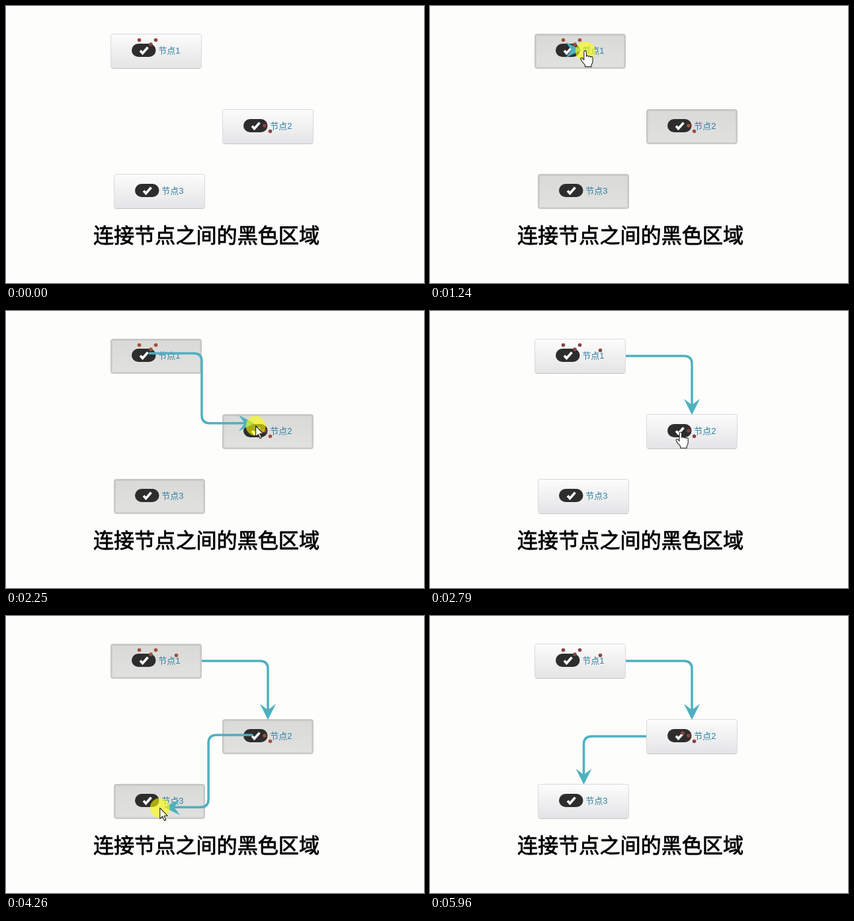
These frames come from a looping animation (632x419 px, 6040 ms). An HTML page:

```html
<!DOCTYPE html>
<html lang="zh-CN">
<head>
<meta charset="utf-8">
<title>连接节点</title>
<style>
  html, body { margin: 0; width: 100%; height: 100%; overflow: hidden; background: #fdfdfb; }
  svg { display: block; width: 632px; height: 419px; }
  .label { font: 13px "Liberation Sans", "Noto Sans CJK SC", "Noto Sans CJK", sans-serif; fill: #2f7f9e; }
  .caption { font: 31.1px "Noto Sans CJK SC", "Noto Sans CJK", sans-serif; fill: #000; stroke: #000; stroke-width: .8; }
  .box { fill: url(#light); stroke: #d9d9de; }
  .edge { fill: none; stroke: #c4c4c6; }
  .inset { fill: none; stroke: #777; stroke-opacity: .16; stroke-width: 2; visibility: hidden; }
  .drag .box { fill: url(#active); stroke: #c4c4c4; }
  .drag .inset { visibility: visible; }
  .drag .edge { visibility: hidden; }
  .pill { fill: #2d2d2d; }
  .check { fill: none; stroke: #fff; stroke-width: 3.6; }
  .dot { fill: #8a4444; }
  .drag .dot { fill: #a0523a; }
  .wire { fill: none; stroke: #4db1c0; stroke-width: 3.5; }
  .head { fill: #4db1c0; }
  .cursor path { stroke: #222; stroke-width: 1.1; stroke-linejoin: round; }
</style>
</head>
<body>
<svg id="stage" viewBox="0 0 632 419">
  <defs>
    <linearGradient id="light" x2="0" y2="1">
      <stop offset="0" stop-color="#fcfcfc"/>
      <stop offset="1" stop-color="#e4e4e6"/>
    </linearGradient>
    <linearGradient id="active" x2="0" y2="1">
      <stop offset="0" stop-color="#d9d9d8"/>
      <stop offset="1" stop-color="#e1e1e0"/>
    </linearGradient>
  </defs>
  <g id="nodes"></g>
  <text class="caption" x="132" y="357.6">连接节点之间的黑色区域</text>
  <g id="dots"></g>
  <g id="wires"></g>
  <circle id="glow" r="15" fill="#ff0" fill-opacity=".6"/>
  <g id="cursor" class="cursor">
    <path id="arrow" fill="#ffffe0" d="M0 0V16.2L3.8 12.8L6.6 19L9 18L6.3 11.8H11.4Z"/>
    <path id="hand" fill="#fff" d="M-2 1a1.8 1.8 0 0 1 3.6 0v6.5a1.8 1.8 0 0 1 3.4 .6a1.7 1.7 0 0 1 3.2 .9a1.6 1.6 0 0 1 3 1.2v5q0 3-2 5v3h-9.5v-2.5q-4-4-6.4-8.5q-.8-2 .8-2.4t3.9 3z"/>
  </g>
</svg>
<script>
const LOOP = 6040, STEPS = 78, STEP = LOOP / STEPS;
const $ = id => document.getElementById(id);

function add(parent, tag, attrs, text) {
  const el = document.createElementNS('http://www.w3.org/2000/svg', tag);
  for (const key in attrs) el.setAttribute(key, attrs[key]);
  if (text) el.textContent = text;
  return parent.appendChild(el);
}

function show(el, on) {
  el.style.display = on ? '' : 'none';
}

// Easings
const out = f => 1 - (1 - f) ** 2;
const into = f => f * f;
const soft = f => .3 * f + .7 * f * f * (3 - 2 * f);

// Where the pointer stops on its way
const outside = [478, 381], first = [216, 64], second = [379, 184], grip = [373, 180];
const turn = [206, 290], third = [214, 279], rest = [214, 285], exit = [535, 400];

// Each move runs between two steps; `via` bends the way
const moves = [
  { from: 3, to: 11, a: outside, b: first, ease: out },
  { from: 14, to: 31, a: first, b: second, via: [372, 100], ease: soft },
  { from: 36, to: 38, a: second, b: grip, ease: out },
  { from: 41, to: 57, a: grip, b: turn, via: [412, 297], ease: soft },
  { from: 57, to: 63, a: turn, b: third, ease: soft },
  { from: 65, to: 67, a: third, b: rest, ease: out },
  { from: 69, to: 76, a: rest, b: exit, ease: into }
];

function pointer(s) {
  const { from, to, a, b, via, ease } = moves.findLast(m => s >= m.from) || moves[0];
  const f = ease(Math.min(1, Math.max(0, (s - from) / (to - from))));
  return a.map((p, i) => {
    const c = via ? via[i] : (p + b[i]) / 2;
    return (1 - f) ** 2 * p + 2 * f * (1 - f) * c + f * f * b[i];
  });
}

const nodes = [[158, 42], [327, 156], [163, 254]];
nodes.forEach(([x, y], i) => {
  const g = add($('nodes'), 'g', { transform: `translate(${x} ${y})` });
  add(g, 'rect', { class: 'box', x: .5, y: .5, width: 137, height: 52, rx: 3 });
  add(g, 'rect', { class: 'inset', x: 2, y: 2, width: 134, height: 49, rx: 2 });
  add(g, 'path', { class: 'edge', d: 'M3 52.5H135' });
  add(g, 'rect', { class: 'pill', x: 32, y: 15, width: 36.5, height: 20, rx: 10 });
  add(g, 'path', { class: 'check', d: 'M45 25.5L48.5 29.5L56.5 20.5' });
  add(g, 'text', { class: 'label', x: 72.3, y: 30 }, '节点' + (i + 1));
});

function addDots(...points) {
  return points.map(([cx, cy]) => add($('dots'), 'circle', { class: 'dot', cx, cy, r: 2.8 }));
}
addDots([201.5, 51.5], [226.5, 51.5], [219, 58], [391, 181], [399.5, 189.5]);

// Drags: press step, release step, grip point, and the wire and dot left behind
const drags = [
  { from: 14, to: 36, at: first, fixed: [[296, 68], [396, 68], [396, 157]], dot: [257.5, 59.5] },
  { from: 40, to: 66, at: grip, fixed: [[327, 182], [232.5, 182], [232.5, 255]], dot: [382, 177] }
];
for (const d of drags) {
  [d.mark] = addDots(d.dot);
  d.wire = add($('wires'), 'path', { class: 'wire' });
  d.head = add($('wires'), 'path', { class: 'head', d: 'M0 0L-24 -12L-15 0L-24 12Z' });
}

const distance = (a, b) => Math.hypot(b[0] - a[0], b[1] - a[1]);

// Point r away from a on the way to b, at most halfway
function toward(a, b, r) {
  const f = Math.min(r / (distance(a, b) || 1), .5);
  return a.map((p, i) => p + (b[i] - p) * f);
}

function drawWire(d, pts) {
  const [prev, tip] = pts.slice(-2);
  const angle = Math.atan2(tip[1] - prev[1], tip[0] - prev[0]) * 180 / Math.PI;
  let path = 'M' + pts[0];
  for (let i = 1; i < pts.length - 1; i++) {
    path += `L${toward(pts[i], pts[i - 1], 12)}Q${pts[i]} ${toward(pts[i], pts[i + 1], 12)}`;
  }
  d.wire.setAttribute('d', path + 'L' + toward(tip, prev, 15));
  d.head.setAttribute('transform', `translate(${tip}) rotate(${angle})`);
}

// Two-bend way that leaves along the longer axis
function elbow([x, y], [ex, ey]) {
  const mx = (x + ex) / 2, my = (y + ey) / 2;
  return Math.abs(ey - y) > Math.abs(ex - x)
    ? [[x, y], [x, my], [ex, my], [ex, ey]]
    : [[x, y], [mx, y], [mx, ey], [ex, ey]];
}

const overPill = ([x, y]) =>
  nodes.some(n => Math.abs(x - n[0] - 50) < 20 && Math.abs(y - n[1] - 25) < 12);

function render(ms) {
  const s = Math.min(STEPS - 1, Math.floor((ms % LOOP + 6) / STEP));
  const pos = pointer(s);
  const drag = drags.find(d => s >= d.from && s < d.to);
  const hand = drag ? distance(pos, drag.at) < 22 : overPill(pos);

  $('stage').classList.toggle('drag', !!drag);
  for (const d of drags) {
    const on = s > d.from;
    show(d.wire, on);
    show(d.head, on);
    show(d.mark, s >= d.to);
    if (s >= d.to) drawWire(d, d.fixed);
    else if (on) drawWire(d, elbow(d.at, pointer(s - .4).map(v => v - 1)));
  }

  show($('glow'), drag);
  show($('cursor'), s >= 3 && s < 77);
  for (const id of ['glow', 'cursor']) $(id).setAttribute('transform', `translate(${pos})`);
  show($('hand'), hand);
  show($('arrow'), !hand);
}

const start = performance.now();
function tick() {
  render(performance.now() - start);
  requestAnimationFrame(tick);
}
tick();
</script>
</body>
</html>
```
